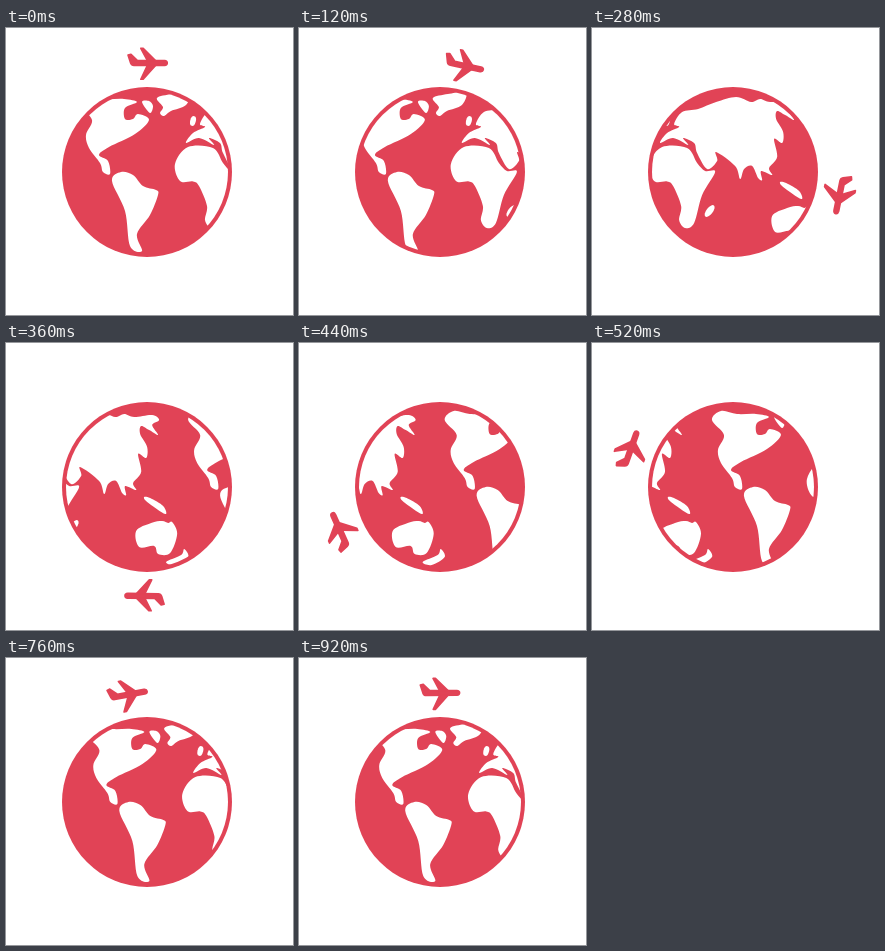
Animation of 287 by 287 pixels, one loop 960 ms. Source, as an HTML page:

```html
<!DOCTYPE html>
<html lang="en">
<head>
<meta charset="utf-8">
<title>Around the globe</title>
<style>
  html, body { margin: 0; width: 100%; height: 100%; overflow: hidden; background: #fff; }
  svg { display: block; width: 100%; height: 100%; }
</style>
</head>
<body>
<svg viewBox="0 0 287 287" fill="#e14356">
  <defs>
    <clipPath id="disc"><circle cx="141" cy="144" r="81"/></clipPath>
    <g id="land">
      <path id="coasts"/>
      <ellipse id="britain" rx="2.8" ry="5" transform="translate(187 93) rotate(15)"/>
      <ellipse id="madagascar" rx="3.2" ry="7" transform="translate(229.5 183) rotate(38)"/>
    </g>
  </defs>
  <circle cx="141" cy="144" r="85"/>
  <g clip-path="url(#disc)" fill="#fff">
    <g id="world"><use href="#land"/><use href="#land" x="270"/></g>
  </g>
  <g id="plane" stroke="#e14356" stroke-width="1.6" stroke-linejoin="round">
    <path d="M122 27L125 26.2L131.5 32.6H158.5Q161.3 32.8 161.3 35Q161.3 37.2 158.5 37.4H128Q125.5 37.4 124.6 35Z"/>
    <path id="wings" d="M134.8 20.3H137.2L150 33H141.5ZM134.8 51.3H137.2L150 37H141.5Z"/>
  </g>
</svg>
<script>
const LOOP = 960, STEP = 40, MAP_WIDTH = 270;

// Key points x,y of each closed coastline
const coasts = {
  northAmerica: `74,77 83,68 99,71 118,71 131,74 119,80 119,91 127,91 132,86 143,92
    129,106 103,119 93,127 102,133 104,146 97,144 94,135 83,120 80,107 86,92`,
  arctic: '136,74 143,73 147,78 144,85',
  greenland: '151,70 166,66 184,64 180,77 165,83 158,88 154,85 157,79',
  southAmerica: `106,153 115,144 127,147 137,158 150,162 152,167 144,187 131,206
    136,223 124,218 119,183`,
  africa: `169,136 182,119 207,120 217,135 225,143 235,144 222,167 214,195 205,200
    199,192 201,178 193,158 187,153.5 174,153`,
  eurasia: `180,115 187,105 199,99 194,96 202,84 218,81 236,74 256,69 271,74 280,71
    290,74 308,72 315,77 308,82 314,92 305,87 297,83 296,91 303,104 302,115 294,111
    297,129 289,140 292,147 281,143 282,152 278,150 272,138 264,141 260,151 255,138
    236,124 237,133 227,141 217,125 214,115 203,110 208,117 193,110`,
  newGuinea: '300,154 306,155 319,163 321,171 303,159',
  australia: `292,188 307,180 318,178 324,180 328,179 333,191 326,210 314,211 310,203
    295,204`,
  newZealand: '322,219 337,212 340,206 344,214 331,222'
};

// Closed Catmull-Rom spline as SVG path data
function smooth(text) {
  const pts = text.trim().split(/\s+/).map(p => p.split(',').map(Number));
  const at = i => pts[(i + pts.length) % pts.length];
  let d = 'M' + pts[0];
  pts.forEach((p, i) => {
    const [before, next, after] = [at(i - 1), at(i + 1), at(i + 2)];
    const c1 = p.map((v, k) => v + (next[k] - before[k]) / 6);
    const c2 = next.map((v, k) => v - (after[k] - p[k]) / 6);
    d += `C${c1} ${c2} ${next}`;
  });
  return d + 'Z';
}

// Ease along cubic-bezier(x1, 0, x2, 1)
function ease(u, x1, x2) {
  let lo = 0, hi = 1, s;
  for (let i = 0; i < 24; i++) {
    s = (lo + hi) / 2;
    const x = 3 * (1 - s) * s * ((1 - s) * x1 + s * x2) + s ** 3;
    if (x < u) lo = s; else hi = s;
  }
  return s * s * (3 - 2 * s);
}

const el = id => document.getElementById(id);
el('coasts').setAttribute('d', Object.values(coasts).map(smooth).join(''));

function draw(now) {
  const u = Math.floor(now % LOOP / STEP) * STEP / LOOP;
  el('world').setAttribute('transform', `translate(${-MAP_WIDTH * ease(u, .33, .21)})`);
  el('plane').setAttribute('transform', `rotate(${360 * ease(u, .44, .224)} 141 144)`);
}

const start = performance.now();
function tick() {
  draw(performance.now() - start);
  requestAnimationFrame(tick);
}
tick();
</script>
</body>
</html>
```
